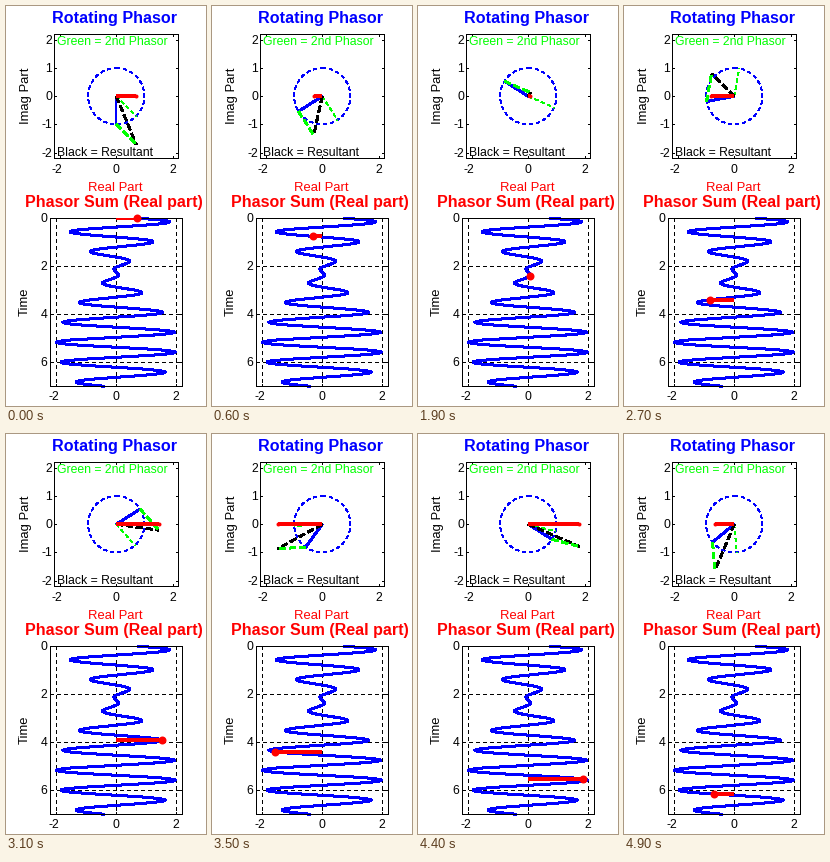
Animation of 200 by 400 pixels, one loop 5 s. Source, as a matplotlib script:

```python
import numpy as np
import matplotlib.pyplot as plt
from matplotlib.animation import FuncAnimation
from matplotlib.patches import Ellipse, Rectangle

FRAMES, INTERVAL = 50, 100
PX = 0.72  # points per pixel at 100 dpi
BLUE, RED, GREEN = "#0000ff", "#ff0000", "#00ff00"
CX, CY, UNIT = 110, 90, 28.2       # phasor plane
TOP, X_UNIT, T_UNIT = 212, 30, 24  # time plot
NUDGE = 0.25  # keeps whole coordinates snapping to their own pixel

plt.rcParams["font.family"] = "Liberation Sans"
plt.rcParams["lines.antialiased"] = False
plt.rcParams["patch.antialiased"] = False
fig = plt.figure(figsize=(2, 4), dpi=100, facecolor="white")
ax = fig.add_axes([0, 0, 1, 1])
ax.set_xlim(-NUDGE, 200 - NUDGE)
ax.set_ylim(400 - NUDGE, -NUDGE)
ax.axis("off")


def line(x, y, color="black", width=1, dash=None, z=2):
    style = (0, dash) if dash else "-"
    return ax.plot(x, y, color=color, lw=width * PX, ls=style, zorder=z,
                   solid_capstyle="butt", dash_capstyle="butt")[0]


def dot(size, z):
    return ax.plot([], [], "o", color=RED, ms=size * PX, mew=0, zorder=z,
                   antialiased=True)[0]


def text(x, y, s, size=12.3, color="black", ha="center", va="baseline", **kw):
    ax.text(x, y, s, fontsize=size * PX, color=color, ha=ha, va=va,
            zorder=4, **kw)


def box(x0, y0, x1, y1, xticks, yticks):
    frame = Rectangle((x0, y0), x1 - x0, y1 - y0, fill=False, lw=PX,
                      ec="black", zorder=3)
    ax.add_patch(frame)
    for x in xticks:
        line([x, x], [y1, y1 - 2])
        line([x, x], [y0, y0 + 2])
    for y in yticks:
        line([x0, x0 + 2], [y, y])
        line([x1, x1 - 2], [y, y])
    return frame


def phasors(t):
    first = np.exp(1j * (7 * t - np.pi / 2))
    second = np.exp(1j * (8.05 * t - np.pi / 4))
    return first, second


# Phasor plane
box(48, 28, 172, 152, [CX + UNIT * v for v in (-2, 0, 2)],
    [CY - UNIT * v for v in range(-2, 3)])
for v in range(-2, 3):
    text(46, CY - UNIT * v + 4, str(v), ha="right")
for v in (-2, 0, 2):
    text(CX + UNIT * v - (2.5 if v < 0 else 0), 167, str(v))
ax.add_patch(Ellipse((CX, CY), 2 * UNIT, 2 * UNIT, fill=False, ec=BLUE,
                     lw=PX, ls=(0, (3, 3))))
text(108, 17, "Rotating Phasor", 16.1, BLUE, weight="bold")
text(50.5, 38.5, "Green = 2nd Phasor", color=GREEN, ha="left")
text(50.5, 150, "Black = Resultant", ha="left")
text(108.7, 185, "Real Part", 13, RED)
text(19.5, 90, "Imag Part", 13, va="center", rotation=90)

# Time plot
xs = [CX + X_UNIT * v for v in (-2, 0, 2)]
ys = [TOP + T_UNIT * v for v in (0, 2, 4, 6)]
frame = box(44, TOP, 176, 380, xs, ys)
for x in xs:
    line([x, x], [TOP, 380], dash=(3, 3), z=1)
for y in ys[1:]:
    line([44, 176], [y, y], dash=(3, 3), z=1)
for x, v in zip(xs, (-2, 0, 2)):
    text(x - (2 if v < 0 else 0), 394, str(v))
for y, v in zip(ys, (0, 2, 4, 6)):
    text(41, y + 4, str(v), ha="right")
text(108, 201, "Phasor Sum (Real part)", 16, RED, weight="bold")
text(18, 296, "Time", 13, va="center", rotation=90)
times = np.linspace(0, 7, 701)
line(CX + X_UNIT * sum(phasors(times)).real, TOP + T_UNIT * times, BLUE, 2)

# Moving parts
second_ray = line([], [], GREEN, 1, (4, 3), z=4)
first_arm = line([], [], BLUE, 2, z=5)
resultant = line([], [], "black", 2, (3, 1.5), z=6)
second_arm = line([], [], GREEN, 2, (3, 1.5), z=7)
real_bar = line([], [], RED, 4, z=8)
real_tip = dot(4, 8)
sum_bar = line([], [], RED, 4, z=8)
sum_bar.set_clip_path(frame)
sum_dot = dot(8, 9)


def place(artist, *points):
    z = np.array(points)
    artist.set_data(CX + UNIT * z.real, CY - UNIT * z.imag)


def update(i):
    t = 2 * np.pi * i / FRAMES
    first, second = phasors(t)
    total = first + second
    place(second_ray, 0j, second)
    place(first_arm, 0j, first)
    place(resultant, 0j, total)
    place(second_arm, first, total)
    place(real_bar, 0j, total.real)
    place(real_tip, total.real)
    x, y = CX + X_UNIT * total.real, TOP + T_UNIT * t
    sum_bar.set_data([CX, x], [y, y])
    sum_dot.set_data([x], [y])
    return ()


anim = FuncAnimation(fig, update, frames=FRAMES, interval=INTERVAL,
                     repeat=True, repeat_delay=0)
plt.show()
```
